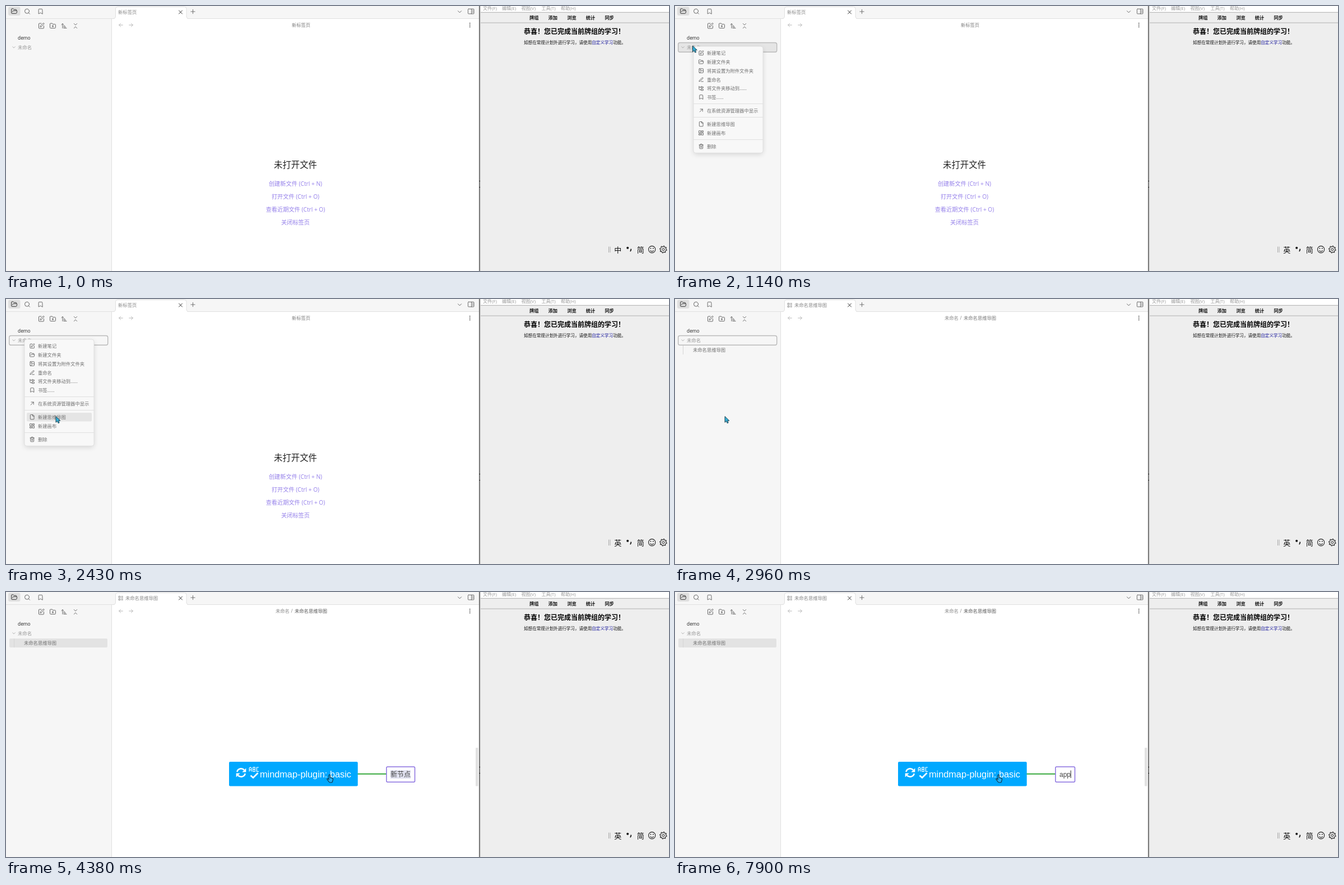
An HTML page for the animation above (8 s loop, 1183 by 473 pixels).

```html
<!DOCTYPE html>
<html lang="zh">
<head>
<meta charset="utf-8">
<style>
  html, body { margin: 0; width: 100%; height: 100%; overflow: hidden; background: #fff; }
  svg { display: block; width: 1183px; height: 473px; }
  text { font-family: "Open Sans", "Noto Sans CJK SC", "Noto Sans CJK", sans-serif; white-space: pre; }
  .cjk { font-family: "Noto Sans CJK SC", "Noto Sans CJK", sans-serif; }
  .arial { font-family: "Liberation Sans", Arial, "Noto Sans CJK SC", sans-serif; }
</style>
</head>
<body>
<svg id="stage" viewBox="0 0 1183 473"></svg>
<script>
const LOOP = 8000;

// 24-unit line icons
const ICONS = {
  folder: 'M6 14l1.5-2.9A2 2 0 0 1 9.2 10H20a2 2 0 0 1 1.9 2.5l-1.5 6a2 2 0 0 1-2 1.5H4a2 2 0 0 1-2-2V5a2 2 0 0 1 2-2h3.9a2 2 0 0 1 1.7.9l.8 1.2a2 2 0 0 0 1.7.9H18a2 2 0 0 1 2 2v2',
  search: 'M19 11a8 8 0 1 1-16 0a8 8 0 1 1 16 0M21 21l-4.3-4.3',
  bookmark: 'M19 21l-7-4-7 4V5a2 2 0 0 1 2-2h10a2 2 0 0 1 2 2z',
  edit: 'M12 3H5a2 2 0 0 0-2 2v14a2 2 0 0 0 2 2h14a2 2 0 0 0 2-2v-7M18.4 2.6a2.1 2.1 0 0 1 3 3L12 15l-4 1 1-4z',
  folderPlus: 'M12 10v6M9 13h6M20 20a2 2 0 0 0 2-2V8a2 2 0 0 0-2-2h-8l-2-3H4a2 2 0 0 0-2 2v13a2 2 0 0 0 2 2z',
  sort: 'M3 8l4-4 4 4M7 4v16M11 12h4M11 16h7M11 20h10',
  collapse: 'M6 21l6-6 6 6M6 3l6 6 6-6',
  close: 'M18 6L6 18M6 6l12 12',
  plus: 'M12 4v16M4 12h16',
  chevron: 'M6 9l6 6 6-6',
  panel: 'M3 3h18a2 2 0 0 1 2 2v14a2 2 0 0 1-2 2H3a2 2 0 0 1-2-2V5a2 2 0 0 1 2-2zM14 3v18M18 8h1.5M18 12h1.5M18 16h1.5',
  left: 'M20 12H4M11 19l-7-7 7-7',
  right: 'M4 12h16M13 5l7 7-7 7',
  dots: 'M12 4.9v.2M12 11.9v.2M12 18.9v.2',
  image: 'M5 3h14a2 2 0 0 1 2 2v14a2 2 0 0 1-2 2H5a2 2 0 0 1-2-2V5a2 2 0 0 1 2-2zM11 9a2 2 0 1 1-4 0a2 2 0 1 1 4 0M21 15l-5-5L5 21',
  pen: 'M12 20h9M16.5 3.5a2.1 2.1 0 0 1 3 3L7 19l-4 1 1-4z',
  tree: 'M13 10h7a1 1 0 0 0 1-1V6h-4l-1-2h-3zM13 21h7a1 1 0 0 0 1-1v-4h-4l-1-2h-3zM3 3v13a2 2 0 0 0 2 2h6M3 7h8',
  upRight: 'M6 18L18 6M8 6h10v10',
  file: 'M14 2H6a2 2 0 0 0-2 2v16a2 2 0 0 0 2 2h12a2 2 0 0 0 2-2V8zV8h6',
  board: 'M3 3h7v9H3zM14 3h7v5h-7zM14 12h7v9h-7zM3 16h7v5H3z',
  map: 'M3 3h6v7H3zM3 15h6v6H3zM14 4h7M14 9h7M14 15h7M14 20h7',
  trash: 'M3 6h18M19 6v14a2 2 0 0 1-2 2H7a2 2 0 0 1-2-2V6M8 6V4a2 2 0 0 1 2-2h4a2 2 0 0 1 2 2v2M10 11v6M14 11v6'
};

const text = (x, cy, s, size, fill, extra = '') =>
  `<text x="${x}" y="${cy + size * 0.37}" font-size="${size}" fill="${fill}" ${extra}>${s}</text>`;
const rect = (x, y, w, h, fill, extra = '') =>
  `<rect x="${x}" y="${y}" width="${w}" height="${h}" fill="${fill}" ${extra}/>`;
const path = (d, stroke, width = 1, extra = '') =>
  `<path d="${d}" fill="none" stroke="${stroke}" stroke-width="${width}" ${extra}/>`;
const icon = (name, cx, cy, size = 11, color = '#666', width = 2) =>
  `<g transform="translate(${cx - size / 2} ${cy - size / 2}) scale(${size / 24})">` +
  path(ICONS[name], color, width, 'stroke-linecap="round" stroke-linejoin="round"') + '</g>';
const group = (id, body) => `<g id="${id}">${body}</g>`;
const middle = 'text-anchor="middle"';

const MENU = [
  ['edit', '新建笔记', 84], ['folder', '新建文件夹', 99.7], ['image', '将其设置为附件文件夹', 115.5],
  ['pen', '重命名', 131.5], ['tree', '将文件夹移动到……', 147], ['bookmark', '书签……', 162.5],
  ['upRight', '在系统资源管理器中显示', 186.5], ['file', '新建思维导图', 210.7],
  ['board', '新建画布', 226.5], ['trash', '删除', 250.5]
];

function sidebar() {
  return rect(0, 0, 844, 22, '#f6f6f6') + rect(0, 22, 188, 451, '#f6f6f6') +
    path('M0 22.5H844M188.5 22V473', '#e0e0e0') +
    rect(4, 1.5, 21.5, 15.5, '#dfdfdf', 'rx="3"') +
    icon('folder', 14.7, 9.3, 12, '#333') + icon('search', 38, 9.7, 12) + icon('bookmark', 61.5, 9.7, 11.5) +
    icon('edit', 63, 35.5, 12) + icon('folderPlus', 83.5, 35.5, 12) +
    icon('sort', 103.5, 35.5, 12) + icon('collapse', 124, 35.5, 11) +
    text(21, 56.5, 'demo', 8.4, '#222') +
    group('rowHover', rect(6, 65.5, 175.5, 17, '#e5e5e5', 'rx="2"')) +
    icon('chevron', 14, 73.7, 9, '#999') + text(21, 73.6, '未命名', 8.4, '#999') +
    group('fileRow',
      group('fileActive', rect(6, 83, 175, 16, '#e3e3e3', 'rx="2"')) +
      path('M14.5 83V99', '#d5d5d5') + text(32, 91, '未命名思维导图', 8.3, '#707070')) +
    group('rowFocus', rect(5.7, 65.5, 176, 16.8, 'none', 'rx="3" stroke="#bababa" stroke-width="1.4"'));
}

function workspace() {
  const links = ['创建新文件 (Ctrl + N)', '打开文件 (Ctrl + O)', '查看近期文件 (Ctrl + O)', '关闭标签页'];
  return path('M191 22.5Q195.5 22.5 195.5 18V5Q195.5 1.5 199 1.5H318.5Q322 1.5 322 5V18Q322 22.5 326.5 22.5', '#e0e0e0', 1, 'style="fill:#fff"') +
    rect(194, 22, 129, 1, '#fff') +
    icon('close', 311.5, 11, 12, '#333') + icon('plus', 333.5, 10, 11) +
    icon('chevron', 809.5, 10.3, 12) + icon('panel', 829.7, 9.6, 11.5) +
    icon('left', 205, 34, 10, '#aaa') + icon('right', 223, 34, 10, '#aaa') +
    icon('dots', 827.7, 34, 11, '#555', 4) +
    group('emptyTab', text(200, 11, '新标签页', 8.4, '#8a8a8a') +
      text(526.5, 34, '新标签页', 8.3, '#808080', middle) +
      text(516.5, 283.7, '未打开文件', 15.4, '#222', `${middle} font-weight="500"`) +
      links.map((s, i) => text(516.5, 317.5 + 22.9 * i, s, 10.2, '#9580ea', middle)).join('')) +
    group('mapTab', icon('map', 205, 11, 9.5, '#777') +
      text(213, 11, '未命名思维导图', 8.3, '#858585') +
      text(481, 34, '未命名', 8.3, '#888') + text(508.5, 34, '/', 8.3, '#888') +
      text(515, 34, '未命名思维导图', 8.3, '#666', 'id="crumb"'));
}

function mindmap() {
  const arrows = [0, 180].map(a => `<g transform="translate(419.5 322.5) rotate(${a})">` +
    path('M-7.2 -1.5A7.3 7.3 0 0 1 5.4 -4.8', '#fff', 2.6) +
    '<path d="M8.8 -8V-1H1.8Z" fill="#fff"/></g>').join('');
  const letters = path('M434.2 320.5V314.2L436 312.8 437.8 314.2V320.5M434.2 317.3H437.8' +
    'M440.7 312.8V320.5H444.2V316.7H440.7M444.2 316.7V312.8H440.7M451 313H447.4V320.3H451', '#fff', 1.2);
  return group('map', rect(838, 278, 4.5, 68.5, '#e1e1e1', 'rx="1"') +
    group('child', path('M627 324.7H679', '#36a83c', 2) +
      rect(678.9, 311.9, 50.6, 27.4, '#fff', 'id="childBox" rx="2" stroke="#8a70e0" stroke-width="1.5"') +
      rect(686, 318, 36, 15, '#dfe0ee', 'id="childMark"') +
      text(686, 326, '', 12, '#444', 'id="childText" class="arial"') +
      path('M0 318.5V332', '#222', 1, 'id="caret"')) +
    rect(398, 303, 230, 43.5, '#00a8ff', 'id="rootBox" rx="2"') +
    group('rootBody', arrows + letters + path('M436.5 327.5L441 331.5L449.5 323', '#fff', 2.7) +
      '<text class="arial" x="453" y="330.8" font-size="16.3" fill="#fff">mindmap-plugin: basic</text>'));
}

function rightPane() {
  const bar = [['文件(F)', 851], ['编辑(E)', 885], ['视图(V)', 919.5], ['工具(T)', 955.5], ['帮助(H)', 990]];
  const tools = ['牌组', '添加', '浏览', '统计', '同步'];
  let gear = '';
  for (let i = 0; i <= 32; i++) {
    const r = i % 4 < 2 ? 6.2 : 4.7, a = (i + 0.5) * Math.PI / 16;
    gear += `${i ? 'L' : 'M'}${(1172.8 + r * Math.cos(a)).toFixed(2)} ${(434.5 + r * Math.sin(a)).toFixed(2)}`;
  }
  return rect(844, 0, 339, 473, '#eee') + rect(846, 0, 337, 11, '#fff') +
    bar.map(([s, x]) => text(x, 4.3, s, 8, '#999')).join('') +
    path('M846 11.3H1183M846 30H1183', '#b0b0b0') +
    tools.map((s, i) => text(934 + 33.6 * i, 21, s, 8.2, '#111', 'class="cjk" font-weight="700"')).join('') +
    text(924, 45.3, '恭喜！您已完成当前牌组的学习！', 12, '#000', 'class="cjk" font-weight="700"') +
    text(924, 65, '如想在常规计划外进行学习，请使用<tspan fill="#1a1a9c">自定义学习</tspan>功能。', 7.58, '#111', 'class="cjk"') +
    ['#555', '#a0a0a0', '#d4d4d4'].map((c, i) => rect(844 + i, 0, 1, 473, c)).join('') +
    path('M844 312.5H846M844 323.5H846', '#222') +
    path('M1075.5 429.5V440M1078 429.5V440', '#aaa') +
    text(1085.3, 434.8, '中', 13, '#111', 'id="ime" class="cjk"') +
    '<circle cx="1109.2" cy="431.8" r="2" fill="#111"/>' + path('M1115.3 433.5Q1115.5 436 1113.8 438', '#111', 1.8) +
    text(1125.7, 434.8, '简', 13, '#111', 'class="cjk"') +
    path('M1158.7 434.5a6.1 6.1 0 1 1-12.2 0a6.1 6.1 0 1 1 12.2 0M1149.4 436.3Q1152.6 440 1155.8 436.3', '#222', 1.1) +
    '<circle cx="1150.4" cy="432.6" r=".9"/><circle cx="1154.8" cy="432.6" r=".9"/>' +
    path(gear + 'Z', '#222', 1.1, 'stroke-linejoin="round"') +
    '<circle cx="1172.8" cy="434.5" r="2" fill="none" stroke="#222"/>';
}

function contextMenu() {
  return group('menu',
    rect(33, 75, 124, 190, '#000', 'rx="5" opacity=".13" filter="url(#blur)"') +
    rect(33, 72, 124, 190.3, '#f8f8f8', 'rx="4" stroke="#dcdcdc" stroke-width=".8"') +
    rect(37, 0, 116, 15.5, '#e5e5e5', 'id="menuHover" rx="2"') +
    path('M33 174.5H157M33 198.5H157M33 238.5H157', '#e0e0e0') +
    MENU.map(([name, label, y]) => icon(name, 46.7, y, 10, '#555') + text(57, y, label, 8.3, '#707070')).join(''));
}

const pointers = group('arrow', '<path d="M0 0V10.8L2.5 8.5L4.3 12.2L6.2 11.3L4.5 7.7H7.8Z" fill="#35b0d8" stroke="#14323e" stroke-width=".9"/>') +
  group('hand', '<path d="M-1 1.5Q-1 0 .3 0T1.6 1.5V5.5L5.4 6.2Q6.7 6.7 6.5 8L5.8 11.6Q5.4 14 4 14H1Q0 14-1 12.5L-4 8.6Q-4.4 7-3 7L-1 8.5Z" fill="#27aef2" stroke="#102a3a" stroke-width="1.1"/>');

const stage = document.getElementById('stage');
stage.innerHTML = '<defs><filter id="blur" x="-20%" y="-20%" width="140%" height="140%"><feGaussianBlur stdDeviation="5"/></filter></defs>' +
  rect(0, 0, 1183, 473, '#fff') + sidebar() + workspace() + mindmap() + rightPane() + contextMenu() + pointers;

const el = id => document.getElementById(id);
const show = (id, on) => el(id).setAttribute('visibility', on ? 'inherit' : 'hidden');
const set = (id, attrs) => { for (const k in attrs) el(id).setAttribute(k, attrs[k]); };

// start, end, number of intervals, from, to
const MOVES = [
  [70, 740, 9, [330, 462], [31.5, 71]],
  [1460, 1950, 7, [31.5, 71], [62, 98]],
  [2220, 2430, 3, [62, 98], [89, 209.5]],
  [3100, 3510, 5, [89, 209.5], [412, 305]],
  [3560, 3910, 5, [412, 305], [489, 319]],
  [4100, 4240, 2, [489, 319], [577, 326]]
];

function pointerAt(t) {
  const move = MOVES.filter(m => t >= m[0]).pop();
  if (!move) return null;
  const [start, end, steps, from, to] = move;
  const u = Math.min(1, (t - start) / (end - start));
  const p = (Math.floor(u * steps) + 1) / (steps + 1);
  const e = p * p * (3 - 2 * p);
  return from.map((v, i) => v + (to[i] - v) * e);
}

function typed(t) {
  return t < 7640 ? '新节点' : 'app'.slice(0, t < 7780 ? 1 : t < 7900 ? 2 : 3);
}

function draw(t) {
  const pos = pointerAt(t);
  const menuOpen = t >= 970 && t < 2740;
  const created = t >= 2820, mapped = t >= 3100, active = t >= 3640, branched = t >= 4310;

  el('ime').textContent = t < 400 ? '中' : '英';
  show('rowHover', t >= 880 && t < 1460);
  show('rowFocus', t >= 970 && !active);
  show('fileRow', created);
  show('fileActive', active);
  show('emptyTab', !created);
  show('mapTab', created);
  set('crumb', { fill: active ? '#555' : '#777' });

  show('menu', menuOpen);
  const item = menuOpen && pos[0] > 37 && MENU.find(m => Math.abs(m[2] - pos[1]) < 7.8);
  show('menuHover', !!item);
  if (item) set('menuHover', { y: item[2] - 7.8 });

  show('map', mapped);
  show('child', mapped && branched);
  const selected = !branched;
  set('rootBox', selected
    ? { x: 398.7, y: 303.7, width: 230.8, height: 44.6, stroke: '#8a70e0', 'stroke-width': 1.4 }
    : { x: 398, y: 303, width: 229.7, height: 43.5, stroke: 'none' });
  set('rootBody', { transform: selected ? 'translate(1.3 1.3)' : '' });

  const label = typed(t), typing = t >= 7640;
  el('childText').textContent = label;
  const width = typing ? 6.67 * label.length : 36;
  set('childBox', { width: width + 14.6 });
  show('childMark', mapped && t >= 4380 && !typing);
  show('caret', typing);
  set('caret', { transform: `translate(${686.2 + width} 0)` });

  const overNode = mapped && pos && pos[0] > 398 && pos[1] > 303;
  show('arrow', !!pos && !overNode);
  show('hand', !!overNode);
  if (pos) set(overNode ? 'hand' : 'arrow', { transform: `translate(${pos[0]} ${pos[1]})` });
}

const origin = performance.now();
function tick() {
  draw((performance.now() - origin) % LOOP);
  requestAnimationFrame(tick);
}
tick();
</script>
</body>
</html>
```
